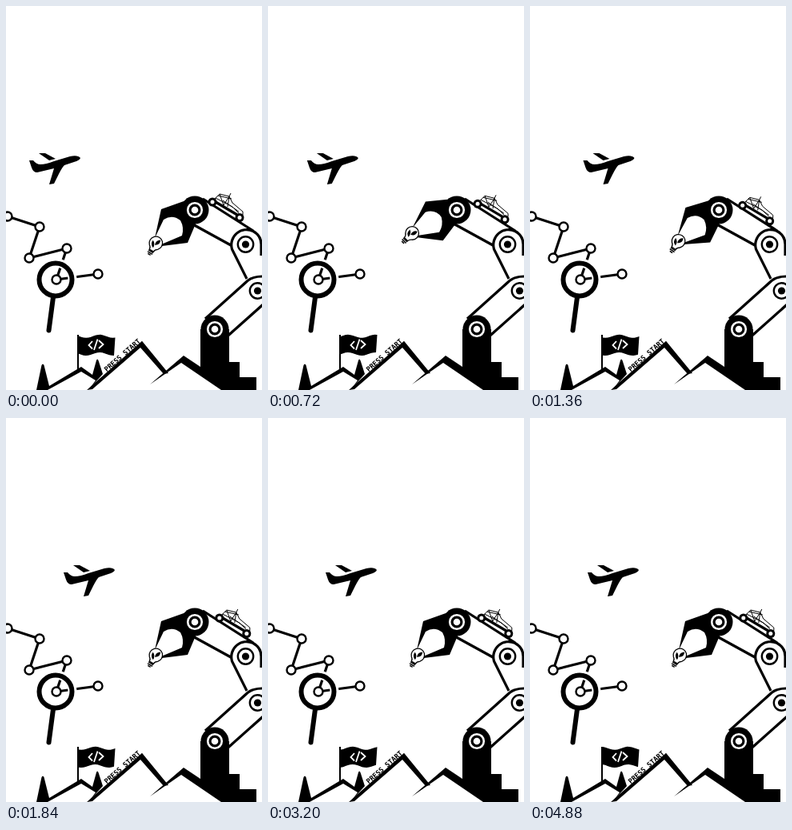
Animation of 320x480 px, one loop 4960 ms. Source, as an HTML page:

```html
<!DOCTYPE html>
<html lang="en">
<head>
<meta charset="utf-8">
<title>Robot arm</title>
<style>
  html, body { margin: 0; width: 100%; height: 100%; overflow: hidden; background: #fff; }
  svg { display: block; width: 100%; height: 100%; }
  .line { fill: none; stroke: #000; stroke-width: 3.2; stroke-linejoin: round; }
  .open { fill: #fff; stroke: #000; stroke-width: 2.4; }
  .thin { fill: none; stroke: #000; stroke-width: 1; }
  .white { fill: none; stroke: #fff; stroke-width: 1.8; }
  text { font: bold 8.6px "DejaVu Sans Mono", monospace; }
</style>
</head>
<body>
<svg viewBox="0 0 320 480">
  <defs>
    <g id="hub">
      <circle r="17.5"/>
      <circle r="8.8" class="white" style="stroke-width:2.6"/>
      <circle r="4.3" fill="#fff"/>
    </g>
    <g id="target">
      <circle r="9.7" class="open"/>
      <circle r="4.6"/>
    </g>
    <g id="wheel">
      <circle r="5.5"/>
      <circle r="2.5" fill="#fff"/>
    </g>
  </defs>

  <g id="plane">
    <path d="M29 193L34 193Q38 198 43 198Q50 198 60 194L80 188Q90 186 93 190Q92 193 85 195L73 199Q70 202 66 210L60 222L54 223L60 203L39 208Q34 208 32 202Z"/>
    <path d="M41 184L49 184L62 191L54 193Z"/>
  </g>

  <g id="graph">
    <path class="line" d="M2 263L42 276L29 315L76 303L63 342L115 335"/>
    <circle cx="62" cy="342" r="21" class="white" style="stroke-width:11"/>
    <circle cx="62" cy="342" r="20.5" class="line" style="stroke-width:6"/>
    <path class="line" style="stroke-width:6;stroke-linecap:round" d="M59 364L53.5 405.5"/>
  </g>

  <g id="mountains">
    <path d="M38 480L44.5 449Q46 446 47.5 449L54 475L94 451L108 461L113 443Q114 440 115.5 443L121 460L103 480L112 468L94 457L52 480Z"/>
    <path d="M101 480L170 418.8L203 459L197 460L168 427L108 479Z"/>
    <path d="M180 473L222 437L243 451V445H292V464H313V480H269L219 446Z"/>
    <text transform="translate(126 457.5) rotate(-41.5)">PRESS START</text>
    <path d="M89 411H91V454H89Z"/>
  </g>

  <path id="flag"/>
  <path class="white" d="M108 419L103.5 424L108 428.5M114.5 416.5L110 430M116 418L121.5 423L116 428"/>

  <g id="arm">
    <path class="line" d="M301 341L282.5 304A19 19 0 0 1 309 281.5A19 19 0 0 1 319 298V312M246 241L309 281M230 271L281 299"/>
    <use href="#target" x="299.5" y="298"/>
    <path class="line" d="M249 391L302.5 343Q309 338 321 338M272 417L327 368"/>
    <use href="#target" x="314.5" y="356"/>
    <path d="M243 404H279V446H243Z"/>
    <use href="#hub" x="261" y="404"/>
  </g>

  <g id="buggy">
    <path class="line" d="M262 245L289 261"/>
    <path class="thin" d="M261 241L267 235L279 238L283 246L296 257L296 261M262 240L283 251L291 259M267 235L272 249L279 238L277 251M265 237L282 241M271 243L291 257M279 238L281 234"/>
    <use href="#wheel" x="258" y="245"/>
    <use href="#wheel" x="292" y="264.5"/>
  </g>

  <g id="claw">
    <path d="M225 243L194 254L186 290L197 267Q208 260 218 268Q223 277 220 287L187 301L227 296L238 270Z"/>
    <g transform="translate(187 297) rotate(31)">
      <path class="open" style="stroke-width:1.3" d="M-3 10Q-3 7 -6 5A8.3 8.3 0 1 1 6 5Q3 7 3 10Z"/>
      <path class="line" style="stroke-width:1.5" d="M-3.5 11.3H3.5M-3.5 13.5H3.5M-2 15.6H2"/>
      <path d="M0 6Q-6 4 -5 -2Q0 0 0 6ZM0 2Q-2 -4 3 -7Q6 -1 0 2Z"/>
    </g>
  </g>
  <use href="#hub" x="236" y="255"/>
</svg>

<script>
const LOOP = 4960, TRAVEL = 1560, PEAK = 1020, REST = 1420, FLAG_CYCLE = 480;
const $ = id => document.getElementById(id);

for (const [x, y] of [[2, 263], [42, 276], [29, 315], [76, 303], [115, 335], [63, 342]]) {
  $('graph').insertAdjacentHTML('beforeend', `<circle class="open" cx="${x}" cy="${y}" r="5.5"/>`);
}

function flagPath(phase) {
  const edge = (base, width) => Array.from({ length: 16 }, (_, i) => {
    const x = 91 + width * i / 15;
    const y = base + 2 * Math.cos(2 * Math.PI * ((x - 100) / 34 - phase));
    return `${x.toFixed(2)} ${y.toFixed(2)}`;
  });
  return 'M' + [...edge(412.8, 45.5), ...edge(435, 44).reverse()].join('L') + 'Z';
}

function clawAngle(t) {
  return t < PEAK ? 20 * t / PEAK : 20 * Math.max(0, (REST - t) / (REST - PEAK));
}

function draw(now) {
  const time = now % LOOP;
  const t = Math.floor(time / 40) * 40;
  const p = Math.min(1, t / TRAVEL);
  $('plane').setAttribute('transform', `translate(${43 * p} 0)`);
  $('buggy').setAttribute('transform', `translate(${8.8 * p} ${5 * p})`);
  $('claw').setAttribute('transform', `rotate(${clawAngle(t)} 234 261)`);
  $('flag').setAttribute('d', flagPath(Math.floor(time / 80) * 80 / FLAG_CYCLE));
}

const start = performance.now();
function tick() {
  draw(performance.now() - start);
  requestAnimationFrame(tick);
}
tick();
</script>
</body>
</html>
```
